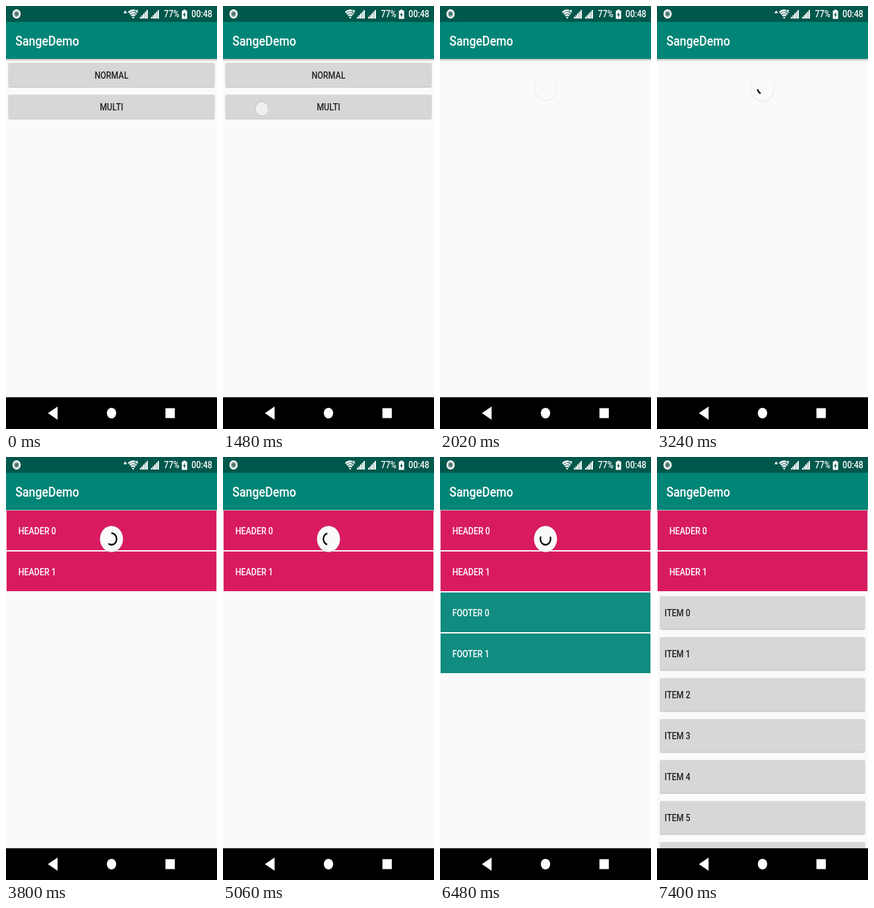
Recreate the animation shown at these times as an HTML page with a canvas. Size 320 by 640 pixels, loop 8000 ms.

```html
<!DOCTYPE html>
<html lang="en">
<head>
<meta charset="utf-8">
<title>SangeDemo</title>
<style>
html, body { margin: 0; width: 100%; height: 100%; overflow: hidden; background: #000; }
canvas { display: block; width: 320px; height: 640px; }
</style>
</head>
<body>
<canvas id="stage" width="320" height="640"></canvas>
<script>
const ctx = document.getElementById('stage').getContext('2d');
const LOOP = 8000, TAU = Math.PI * 2;
const PRESS = 1480, OPEN = 1660, HEADERS = 3270, FOOTERS = 5270, ITEMS = 7300;
const SPIN_START = 2174, SPIN_CYCLE = 1332, SPIN_FREEZE = 7180;
const BG = '#fafafa', WHITE = '#ffffff', BUTTON = '#d6d7d7', INK = '#212121';
const RED = '#d81b60', GREEN = '#108c80', BAR = '#008577', STATUS = '#00574b';

const clamp = v => Math.min(1, Math.max(0, v));

function rect(x, y, w, h, color) {
  ctx.fillStyle = color;
  ctx.fillRect(x, y, w, h);
}

function circle(x, y, r, color) {
  ctx.beginPath();
  ctx.arc(x, y, r, 0, TAU);
  ctx.fillStyle = color;
  ctx.fill();
}

function polygon(points, color) {
  ctx.beginPath();
  points.forEach(([x, y]) => ctx.lineTo(x, y));
  ctx.fillStyle = color;
  ctx.fill();
}

function text(label, x, y, color, size = 14, align = 'left') {
  ctx.font = `500 ${size}px Roboto, sans-serif`;
  ctx.textAlign = align;
  ctx.fillStyle = color;
  ctx.fillText(label, x, y);
}

// cubic-bezier(.4, 0, .2, 1)
function fastOutSlowIn(x) {
  let lo = 0, hi = 1, u = 0.5;
  for (let i = 0; i < 18; i++) {
    u = (lo + hi) / 2;
    const v = 1 - u;
    if (1.2 * v * v * u + 0.6 * v * u * u + u ** 3 < x) lo = u; else hi = u;
  }
  return 3 * (1 - u) * u * u + u ** 3;
}

function roundRect(x, y, w, h, color) {
  ctx.beginPath();
  ctx.roundRect(x, y, w, h, 2);
  ctx.fillStyle = color;
  ctx.fill();
}

function button(x, y, w, h) {
  roundRect(x, y + 1.5, w, h, '#c6c6c6');
  roundRect(x, y, w, h, BUTTON);
}

function windowFrame() {
  rect(0, 0, 360, 592, BG);
  rect(0, 0, 360, 24, STATUS);
  rect(0, 24, 360, 56, BAR);
  const shade = ctx.createLinearGradient(0, 80, 0, 84);
  shade.addColorStop(0, 'rgba(0,0,0,.25)');
  shade.addColorStop(1, 'rgba(0,0,0,0)');
  rect(0, 80, 360, 4, shade);
  text('SangeDemo', 16, 59.5, WHITE, 20);
}

function menuScreen(t) {
  windowFrame();
  ['NORMAL', 'MULTI'].forEach((label, i) => {
    const y = 86 + 48 * i;
    button(4, y, 352, 36);
    if (i && t > PRESS) {
      ctx.save();
      ctx.beginPath();
      ctx.rect(4, y, 352, 36);
      ctx.clip();
      circle(66, 155, clamp((t - PRESS) / 300) * 300, 'rgba(0,0,0,.12)');
      ctx.restore();
    }
    text(label, 180, y + 23.5, INK, 14, 'center');
  });
}

function panel(row, label, color) {
  const y = 81 + 62 * row;
  rect(1, y, 358, 60, color);
  text(label, 21, y + 35.5, WHITE);
}

function spinner(t) {
  const grow = clamp((t - 1690) / 400);
  const scale = t < ITEMS ? (1 - Math.cos(grow * Math.PI)) / 2 : clamp((7400 - t) / 130);
  if (!scale) return;
  ctx.save();
  ctx.translate(180, 124);
  ctx.scale(scale, scale);
  circle(0, 0.4, 20.3, 'rgba(0,0,0,.1)');
  circle(0, 0, 19.7, BG);
  const turns = (Math.min(t, SPIN_FREEZE) - SPIN_START) / SPIN_CYCLE;
  if (turns > 0) {
    const cycle = Math.floor(turns), phase = turns - cycle;
    let start = 0.78 * cycle, length;
    if (phase < 0.5) {
      length = 0.79 * fastOutSlowIn(phase * 2) + 0.01;
    } else {
      length = 0.79 * (1 - fastOutSlowIn(phase * 2 - 1)) + 0.01;
      start += 0.79 - length;
    }
    start += 0.81 * turns;
    ctx.beginPath();
    ctx.arc(0, 0, 8.75, start * TAU, (start + length) * TAU);
    ctx.lineWidth = 2.5;
    ctx.lineCap = 'square';
    ctx.strokeStyle = '#000';
    ctx.stroke();
  }
  ctx.restore();
}

function listScreen(t) {
  windowFrame();
  if (t >= HEADERS) [0, 1].forEach(i => panel(i, 'HEADER ' + i, RED));
  if (t >= ITEMS) {
    for (let i = 0; i < 7; i++) {
      const y = 205 + 62 * i;
      button(5, y + 5.5, 350, 49.5);
      text('ITEM ' + i, 13, y + 35.5, INK);
    }
  } else if (t >= FOOTERS) {
    [0, 1].forEach(i => panel(i + 2, 'FOOTER ' + i, GREEN));
  }
  spinner(t);
}

function statusIcons(t) {
  circle(18, 12, 7, WHITE);
  circle(18, 12, 4.6, '#8aa39f');
  circle(18, 12, 2.4, '#3d6f67');
  const uploading = t < 720 || (t >= 2700 && t < 4340) || t >= 6800;
  if (uploading) polygon([[200.5, 11], [203.5, 6.5], [206.5, 11]], WHITE);

  ctx.strokeStyle = WHITE;
  ctx.lineCap = 'butt';
  ctx.lineWidth = 2.6;
  for (const r of [4.5, 8, 11.4]) {
    ctx.beginPath();
    ctx.arc(217, 18, r, -TAU * 3 / 8, -TAU / 8);
    ctx.stroke();
  }
  polygon([[217, 19.5], [214.7, 16.5], [219.3, 16.5]], WHITE);
  rect(220, 5, 6, 6, STATUS);
  ctx.lineWidth = 1.4;
  ctx.beginPath();
  ctx.moveTo(221, 6); ctx.lineTo(225, 10);
  ctx.moveTo(225, 6); ctx.lineTo(221, 10);
  ctx.stroke();

  for (const x of [228.5, 247.5])
    for (let i = 0; i < 5; i++) rect(x + 2.8 * i, 16.5 - 2.6 * i, 2.3, 2.5 + 2.6 * i, WHITE);

  text('77%', 269.5, 17.3, WHITE);
  rect(300, 7, 9, 12.5, WHITE);
  rect(302.5, 5.5, 4, 2, WHITE);
  polygon([[305.5, 8.5], [302, 14], [304.2, 14], [303.5, 18], [307, 12.5], [304.8, 12.5]], STATUS);
  text('00:48', 316.5, 17.3, WHITE);
}

function navigationBar() {
  rect(0, 592, 360, 48, '#000');
  polygon([[71.5, 616], [88, 606], [88, 626]], WHITE);
  circle(180, 616, 8, WHITE);
  rect(272, 608.5, 16, 15, WHITE);
}

function draw(t) {
  // The layout is 360 units wide, squeezed into a 320 px stage.
  ctx.setTransform(8 / 9, 0, 0, 1, 0, 0);
  const enter = clamp((t - OPEN) / 340);
  if (enter < 1) menuScreen(t);
  if (enter > 0) {
    ctx.save();
    ctx.globalAlpha = 1 - (1 - clamp((t - OPEN) / 200)) ** 4;
    ctx.translate(0, 51 * (1 - enter) ** 5);
    listScreen(t);
    ctx.restore();
  }
  statusIcons(t);
  navigationBar();
  if (t >= PRESS && t < 1580) {
    circle(66.4, 155.5, 11.4, '#c4c4c4');
    circle(66.4, 155.5, 10.6, '#efefef');
  }
}

function tick() {
  draw(performance.now() % LOOP);
  requestAnimationFrame(tick);
}
tick();
</script>
</body>
</html>
```
